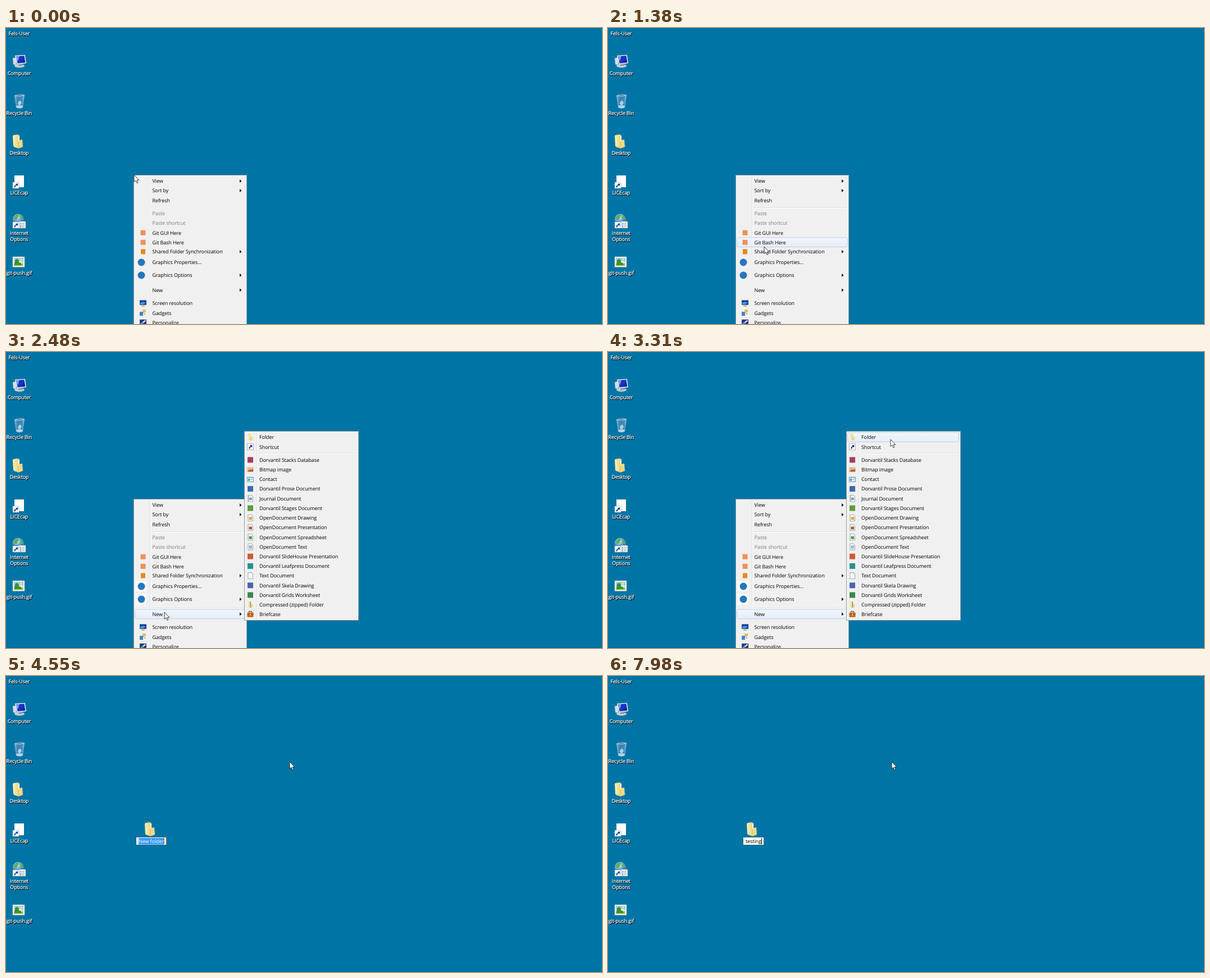
Animation of 1061x528 px, one loop 8000 ms. Source, as an HTML page:

```html
<!DOCTYPE html>
<html lang="en">
<head>
<meta charset="utf-8">
<title>New folder</title>
<style>
  html, body { margin: 0; width: 100%; height: 100%; overflow: hidden; background: #0075a5; }
  svg { display: block; width: 1061px; height: 528px; }
  text { font: 9px "Open Sans", "Noto Sans", sans-serif; letter-spacing: -.1px; text-rendering: geometricPrecision; white-space: pre; }
  .label, .shade { text-anchor: middle; fill: #fff; stroke: #fff; stroke-width: .25px; }
  .shade { fill: #000; stroke: #001a28; stroke-width: 1.3px; stroke-opacity: .6; }
  .off { fill: #7d7d7d; }
</style>
</head>
<body>
<svg id="stage" viewBox="0 0 1061 528">
  <defs>
    <linearGradient id="hover" x2="0" y2="1"><stop stop-color="#f3f6fa"/><stop offset="1" stop-color="#e6edf6"/></linearGradient>
    <linearGradient id="paper" x2="1"><stop stop-color="#fbf0b4"/><stop offset="1" stop-color="#ecd583"/></linearGradient>
    <linearGradient id="screen" x2="1" y2="1"><stop stop-color="#0a1fa0"/><stop offset=".5" stop-color="#1738cf"/><stop offset="1" stop-color="#060f78"/></linearGradient>
    <linearGradient id="bin" x2="1"><stop stop-color="#8fbdd8"/><stop offset=".3" stop-color="#3c86b4"/><stop offset=".75" stop-color="#3f8ab8"/><stop offset="1" stop-color="#9cc6de"/></linearGradient>
    <radialGradient id="globe" cx=".4" cy=".3"><stop stop-color="#d5f0fc"/><stop offset="1" stop-color="#2b7cc4"/></radialGradient>
    <clipPath id="seen"><rect id="seenBox" x="227" y="262" width="202" height="0"/></clipPath>
    <g id="folder">
      <path d="M1 2 10 1 12 3V23L3 24Z" fill="#e6cb78"/>
      <path d="M8 4 12 3V15L9 22Z" fill="#fdfaf0"/>
      <path d="M0 3 8 1 10 4V26L1 22Z" fill="url(#paper)"/>
      <path d="M10 13 12 11 17 10 18 23 10 26Z" fill="#f0d987"/>
      <path d="M10 14V26" stroke="#cdae55" stroke-width=".7"/>
    </g>
    <g id="badge">
      <rect width="11" height="11" fill="#fff" stroke="#8fa4b8" stroke-width=".6"/>
      <path d="M2.500 9.300Q2.300 5.500 6 5L5 3.200 9.300 2.200 9 6.800 7.400 6Q4.500 6.300 4.600 9.500Z" fill="#17479b"/>
    </g>
  </defs>
  <rect width="1061" height="528" fill="#0075a5"/>
  <rect y="527" width="1061" height="1" fill="#006894"/>
  <g id="desktop"></g>
  <g id="menu"></g>
  <g id="submenu"></g>
  <g id="rename">
    <use href="#folder" x="247" y="260"/>
    <rect id="box" y="287.500" height="14" fill="#fff" stroke="#0c3549" stroke-opacity=".6"/>
    <rect id="selection" y="289" height="11.500" fill="#3399ff"/>
    <text id="name" y="298"></text>
    <rect id="caret" y="289" width="1" height="11"/>
  </g>
  <circle id="click" cx="505.500" cy="153.500" r="8" fill="none" stroke="#222"/>
  <path id="cursor" d="M0 0V12.500L2.900 9.900 5 14.600 7 13.700 5 9.300H8.800Z" fill="#fff" stroke="#111" stroke-width=".8"/>
</svg>
<script>
const LOOP = 8000;
const $ = id => document.getElementById(id);
const rect = (x, y, w, h, fill, more = '') => `<rect x="${x}" y="${y}" width="${w}" height="${h}" fill="${fill}" ${more}/>`;
const disc = (x, y, r, fill) => `<circle cx="${x}" cy="${y}" r="${r}" fill="${fill}"/>`;
const path = (d, fill) => `<path d="${d}" fill="${fill}"/>`;
const text = (x, y, s, cls = '') => `<text x="${x}" y="${y + 3.3}" class="${cls}">${s}</text>`;
const at = (x, y, s) => `<g transform="translate(${x} ${y})">${s}</g>`;

// Small icons, drawn around their centre
const square = c => rect(-5, -5, 10, 10, c);
const page = (inner = '') => path('M-4.500-6H2L5-3V6H-4.500Z', '#8a949c') + path('M-3.700-5.200H1.700L4.200-2.700V5.200H-3.700Z', '#f8fafb') + inner;
const tinted = c => page(rect(-2.5, -1.5, 5.5, 5, c));
const lines = c => [-2, 0, 2].map(y => rect(-2.5, y, 5.5, .9, c)).join('');
const monitor = c => rect(-6, -5.5, 12, 8.5, '#39434d') + rect(-5, -4.5, 10, 6.5, c) + rect(-3, 4, 6, 1.5, '#8d979f');
const smallFolder = '<g transform="scale(.48) translate(-9 -13.500)"><use href="#folder"/></g>';
const icons = {
  git: rect(-4.5, -4.5, 9, 9, '#ee9158'),
  sync: rect(-4, -4.5, 8, 9, '#e8861c'),
  chip: disc(-3, 0, 6.5, '#2577bd'),
  screen: monitor('#1538c8') + path('M-5 2V-1Q0-4 5-1L0 2Z', '#35a2e0'),
  gadgets: rect(-6, -2, 7, 7, '#3f83bd') + rect(-1, -6, 6, 5, '#e5bd55') + disc(3, 2.5, 3.3, '#f0f4f7') + rect(2.6, 0, .8, 3, '#445'),
  personal: monitor('#2433b5') + path('M-5 2 4-5 5-3-1 2Z', '#d8e9f2') + path('M-5 2-1-1 1 2Z', '#48a24c'),
  folder: smallFolder,
  shortcut: rect(-5.5, -5.5, 11, 11, '#fff', 'stroke="#8c98a5" stroke-width=".7"') + path('M-2.500 3.500Q-3-.500 0-1L-1-3 3.500-3.500 3 1 1.500 0Q-1 .500-.500 3.500Z', '#23337e'),
  bitmap: rect(-6, -4.5, 12, 9, '#d8d2c8') + rect(-5, -3.5, 10, 7, '#f0b572') + path('M-5 3.500-1 0 2 1 5-1V3.500Z', '#ad4e36'),
  contact: rect(-6, -4, 12, 9, '#5f9dbc') + rect(-5, -2.5, 10, 6.5, '#e6f5fc') + rect(-4, -1, 3, 4, '#4d95c0') + rect(0, 0, 4, 1, '#79a9c0'),
  journal: page(disc(.5, .5, 2.5, '#6d9dc2') + rect(-3.7, -5, 1.3, 10, '#9caab5')),
  drawing: tinted('#e0a32e'), slides: tinted('#b8522d'), sheet: tinted('#3da543'), writer: page(lines('#2d6ca8')),
  plain: page(),
  zip: smallFolder + rect(-.5, -5, 1.5, 10, '#8b8c8d'),
  briefcase: rect(-2.5, -5.5, 5, 3, 'none', 'stroke="#754315"') + rect(-5.5, -3.5, 11, 8.5, '#c5702a', 'rx="1"') + rect(-5.5, 0, 11, 1, '#844313') + rect(-1, -.5, 2, 2.5, '#f0d080')
};

// Desktop icons and their shadowed labels
const label = (y, s) => text(24.1, y + .8, s, 'shade') + text(23.5, y, s, 'label');
const computer =
  '<ellipse cx="24" cy="67.500" rx="9" ry="3.300" fill="#c3ced7"/>' +
  path('M12 54 18 52V66L13 65Z', '#d5dde4') + path('M22 62 29 61 30 67 22 68Z', '#8c9aa6') +
  path('M16 49 34 48 36 63 19 65Z', '#dfe7ed') + path('M18 50.500 32.500 49.500 34.300 61.500 20.500 63Z', 'url(#screen)') +
  path('M18 50.500 24 50.100 21.500 58 19.500 58.500Z', '#7d9cea');
const recycleBin =
  path('M15 121 33 120 30 142Q24 145 18 142Z', 'url(#bin)') +
  path('M14.500 120.500Q24 117 33.500 119.500 24 124 14.500 120.500Z', '#c3dfee') + path('M17 120.500Q24 118.500 31 120 24 122 17 120.500Z', '#4d7f9e') +
  path('M18 139Q24 136 30 139L29.500 142Q24 144.500 18.500 142Z', '#b4d3e4') + path('M21 133 25 129 28 133 26 137 22 137Z', '#a7d2ec');
const internetOptions =
  disc(22, 342, 10.5, 'url(#globe)') + path('M14 338Q18 331 23 334L20 341 16 343ZM25 333Q31 336 31 343L26 341Z', '#5fb04c') +
  rect(23, 345, 12, 12, '#f7f8f8', 'stroke="#8b9aa5" stroke-width=".6"') +
  [348, 351, 354].map(y => rect(25, y, 2, 1.5, '#3a7eb7') + rect(28, y, 5, 1, '#999')).join('') +
  '<use href="#badge" x="12" y="346"/>';
const picture =
  rect(12, 408, 21, 18.5, '#fff', 'stroke="#9ba6a8" stroke-width=".6"') + rect(14, 410, 17, 14.5, '#8fcdf0') +
  path('M14 417Q21 413 31 417V421H14Z', '#d8ecf4') + path('M14 424.500V421Q22 418 31 420V424.500Z', '#b9c94a') +
  path('M15 423Q15 413 19 412 24 413 23 418 28 419 28 423Z', '#3f8f2f') + disc(27, 413, 2, '#f7e27a');

$('desktop').innerHTML = computer + recycleBin + '<use href="#folder" x="12" y="189"/>' +
  rect(15, 263, 17, 21, '#fff') + '<use href="#badge" x="12" y="275"/>' + internetOptions + picture +
  label(9.5, 'Fels-User') + label(80.5, 'Computer') + label(152, 'Recycle Bin') + label(223, 'Desktop') +
  label(294, 'LICEcap') + label(365.5, 'Internet') + label(377, 'Options') + label(436.5, 'git-push.gif');

// name, centre, icon, kind: > opens further, - disabled
const rows = [
  ['View', 273, '', '>'], ['Sort by', 290, '', '>'], ['Refresh', 307.3],
  ['Paste', 330.6, '', '-'], ['Paste shortcut', 348, '', '-'],
  ['Git GUI Here', 365.2, 'git'], ['Git Bash Here', 382.3, 'git'],
  ['Shared Folder Synchronization', 399, 'sync', '>'],
  ['Graphics Properties...', 418, 'chip'], ['Graphics Options', 441, 'chip', '>'],
  ['New', 467.5, '', '>'],
  ['Screen resolution', 491, 'screen'], ['Gadgets', 508.3, 'gadgets'], ['Personalize', 525.5, 'personal']
].map(([name, y, icon, kind]) => ({ name, y, icon, kind, h: icon === 'chip' ? 22 : 17.2 }));

const maker = 'Dorvantil ';
const subRows = [
  ['Folder', 'folder'], ['Shortcut', 'shortcut'],
  [maker + 'Stacks Database', '#a63d62'], ['Bitmap image', 'bitmap'], ['Contact', 'contact'],
  [maker + 'Prose Document', '#3b68ad'], ['Journal Document', 'journal'], [maker + 'Stages Document', '#5f9b3c'],
  ['OpenDocument Drawing', 'drawing'], ['OpenDocument Presentation', 'slides'],
  ['OpenDocument Spreadsheet', 'sheet'], ['OpenDocument Text', 'writer'],
  [maker + 'SlideHouse Presentation', '#d05a38'], [maker + 'Leafpress Document', '#25918e'],
  ['Text Document', 'plain'], [maker + 'Skela Drawing', '#4964b0'], [maker + 'Grids Worksheet', '#39894a'],
  ['Compressed (zipped) Folder', 'zip'], ['Briefcase', 'briefcase']
].map(([name, icon], i) => ({ name, icon, h: 17.2, y: 152 + 17.22 * i + (i > 1 ? 6 : 0) }));

const panel = (x, y, w, h) => rect(x + .5, y + .5, w - 1, h - 1, '#f0f0f0', 'stroke="#979797"') +
  rect(x + 1.5, y + 1.5, w - 3, h - 3, 'none', 'stroke="#f7f7f7"');
const groove = (x, y, w, h) => rect(x, y, w, h, '#dedfe0') + rect(x + (w === 1), y + (h === 1), w, h, '#fff');
const hover = (id, x, w) => rect(x, 0, w, 16.5, 'url(#hover)', `id="${id}" rx="2" stroke="#b3d0ee" stroke-width=".9"`);
const draw = (list, iconX, textX) => list.map(({ name, y, icon, kind }) =>
  (icon ? at(iconX, y, icons[icon] || square(icon)) : '') +
  text(textX, y, name, kind === '-' ? 'off' : '') +
  (kind === '>' ? path(`M416 ${y - 3}l3.500 3-3.500 3Z`, '#111') : '')).join('');

$('menu').innerHTML = panel(227, 262, 202, 280) +
  `<g clip-path="url(#seen)">${groove(256, 264, 1, 276)}${groove(258, 320, 168, 1)}${groove(258, 456.5, 168, 1)}` +
  `${rect(231, 408, 19, 19, '#fff')}${rect(231, 431.5, 19, 19, '#fff')}</g>` +
  hover('hot', 229.5, 197) + draw(rows, 244, 260.5);
$('submenu').innerHTML = panel(424, 141, 204, 338) +
  groove(446, 143, 1, 334) + groove(448, 180.5, 177, 1) +
  hover('subHot', 426.5, 198) + draw(subRows, 435, 451);

// time, pointer x, pointer y
const moves = [
  [0, 228, 262], [410, 232, 271], [550, 241, 291], [690, 251, 313], [820, 261, 337], [960, 270, 361], [1100, 277, 382],
  [1380, 278, 390], [1520, 279, 400], [1660, 280, 412], [1800, 280, 426], [1950, 281, 440], [2090, 282, 459], [2230, 282, 464],
  [2650, 360, 465], [2810, 440, 463], [2980, 478, 350], [3140, 497, 222], [3310, 503, 156],
  [3730, 504, 155], [3860, 504, 154], [4000, 505, 153]
];
const typed = [[4550, 'New folder'], [6440, 'te'], [6730, 'test'], [7720, 'testi'], [7850, 'testin'], [7980, 'testing']];
const caretOff = [[4980, 5580], [6160, 6440], [7310, 7720]];

const latest = (table, t) => table.filter(step => step[0] <= t).pop();
const show = (id, on) => $(id).setAttribute('visibility', on ? 'visible' : 'hidden');
const set = (id, attrs) => { for (const k in attrs) $(id).setAttribute(k, attrs[k]); };

function highlight(id, list, y, on) {
  const row = on && list.find(r => Math.abs(y - r.y) <= r.h / 2);
  show(id, row);
  if (row) set(id, { y: row.y - row.h / 2 + .3, height: row.h - .6 });
}

function edit(t) {
  const [start, word] = latest(typed, t);
  const selected = start === 4550;
  $('name').textContent = word;
  const w = Math.ceil($('name').getComputedTextLength());
  const x = Math.floor(259 - w / 2);
  set('name', { x, fill: selected ? '#fff' : '#000' });
  set('box', { x: x - 4.5, width: w + 9 });
  set('selection', { x, width: w });
  set('caret', { x: x + w, fill: selected ? '#cc6600' : '#000' });
  show('selection', selected);
  show('caret', !caretOff.some(([a, b]) => t >= a && t < b));
}

function render(t) {
  const [, x, y] = latest(moves, t);
  const open = t < 4550, sub = open && t >= 2480;
  for (const [id, on] of [['menu', open], ['submenu', sub], ['rename', !open]]) $(id).style.display = on ? '' : 'none';
  if (open) {
    highlight('hot', rows, sub ? 467.5 : y, true);
    highlight('subHot', subRows, y, sub && x > 424);
    set('seenBox', { height: t < 410 ? 0 : (sub ? 479 : y + 15) - 262 });
  } else edit(t);
  show('click', t >= 4410 && open);
  show('cursor', t < 6440 || t >= 6730);
  set('cursor', { transform: `translate(${x} ${y})` });
}

const begin = performance.now();
(function tick() {
  render((performance.now() - begin) % LOOP);
  requestAnimationFrame(tick);
})();
</script>
</body>
</html>
```
